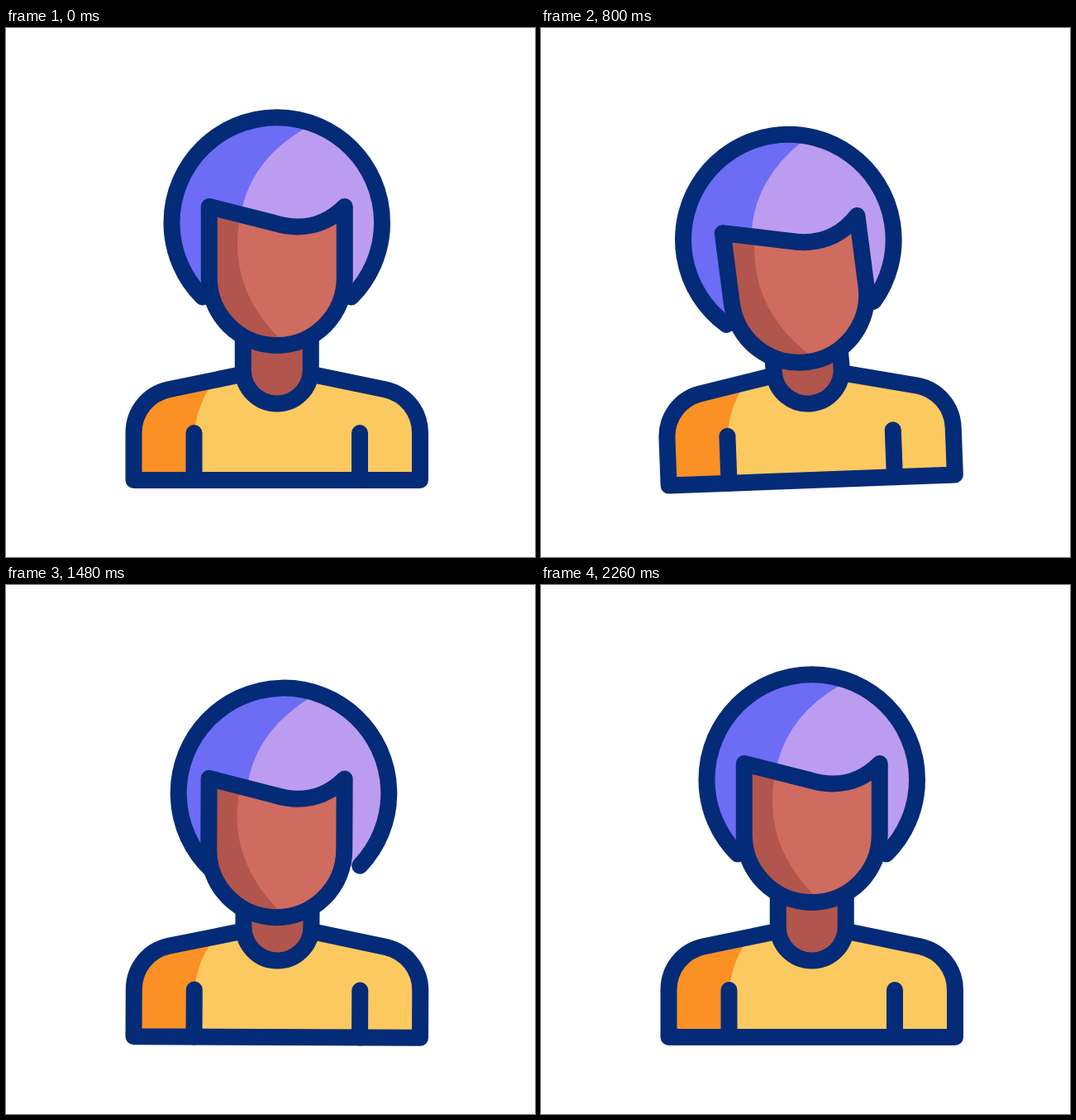
An HTML page for the animation above (2.4 s loop, 640 by 640 pixels).

```html
<!DOCTYPE html>
<html lang="en">
<head>
<meta charset="utf-8">
<title>Avatar</title>
<style>
  html, body { margin: 0; width: 100%; height: 100%; overflow: hidden; background: #fff; }
  svg { display: block; width: 100vw; height: 100vh; }
  .line { fill: none; stroke: #042b77; stroke-width: 20; stroke-linecap: round; stroke-linejoin: round; }
</style>
</head>
<body>
<svg viewBox="0 0 640 640">
  <defs>
    <path id="hairShape" d="M-90 90A127.3 127.3 0 1 1 90 90"/>
    <path id="faceShape" d="M-82 -86L-3 -66C28 -56.5 58 -62 82 -86V0A82 82 0 0 1 -82 0Z"/>
    <path id="shirtShape" d="M154.5 547V490C154.5 464 172 443 196 437.5L283 419.5H372.5L459.5 437.5C483.5 443 501 464 501 490V547Z"/>
    <clipPath id="hairClip"><use href="#hairShape"/></clipPath>
    <clipPath id="faceClip"><use href="#faceShape"/></clipPath>
    <clipPath id="shirtClip"><use href="#shirtShape"/></clipPath>
  </defs>

  <g id="body">
    <use href="#shirtShape" fill="#fb9025"/>
    <path clip-path="url(#shirtClip)" fill="#fbc95f" d="M256 422Q232 450 227.5 490V560H520V410H256Z"/>
    <use href="#shirtShape" class="line"/>
    <path class="line" d="M227.5 490V547M428 490V547"/>
  </g>

  <g id="neck">
    <path class="line" style="fill:#b2554c;stroke-linecap:butt" d="M-41 -45V0A41 41 0 0 0 41 0V-45"/>
  </g>

  <g id="hair">
    <use href="#hairShape" fill="#6c6cf5"/>
    <path clip-path="url(#hairClip)" fill="#bc9cf0" d="M60 -128L34.5 -114.5Q-26.8 -79 -41.5 -20.5L-50 20V100H140V-128Z"/>
    <use href="#hairShape" class="line"/>
  </g>

  <g id="face">
    <use href="#faceShape" fill="#b2554c"/>
    <path clip-path="url(#faceClip)" fill="#d06b60" d="M-44 -76C-56 -20 -40 32 6 76L90 90V-95H-44Z"/>
    <use href="#faceShape" class="line"/>
  </g>
</svg>

<script>
  const LOOP = 2400, STEP = 20, START = 200, SEGMENT = 500;
  const CENTER = 327.75, FLOOR = 547, NECK_RISE = 133.5;

  const [body, neck, hair, face] =
    ['body', 'neck', 'hair', 'face'].map(id => document.getElementById(id));

  // Eases from rest through three extremes and back to rest.
  function sway(time, extremes, lag = 0) {
    const keys = [0, ...extremes, 0];
    const pos = Math.min(Math.max((time - START - lag) / SEGMENT, 0), 4);
    const i = Math.min(Math.floor(pos), 3);
    const u = pos - i;
    return keys[i] + (keys[i + 1] - keys[i]) * u * u * (3 - 2 * u);
  }

  function place(part, x, y, angle) {
    part.setAttribute('transform', `translate(${x} ${y}) rotate(${angle})`);
  }

  function draw(time) {
    const lean = sway(time, [-3, 5, -3]);
    const tilt = sway(time, [-10, 15, -10]);
    const rad = lean * Math.PI / 180;

    body.setAttribute('transform', `rotate(${lean} ${CENTER} ${FLOOR})`);
    place(neck,
      CENTER + NECK_RISE * Math.sin(rad),
      FLOOR - NECK_RISE * Math.cos(rad),
      (lean + tilt) / 2);
    place(face,
      CENTER + sway(time, [-21.5, 35.4, -25.5]),
      302 + sway(time, [22, 10.4, 23.6]),
      tilt);
    // The hair trails the face a little.
    place(hair,
      CENTER + sway(time, [-33, 53, -36.5], 30),
      235.5 + sway(time, [20.7, 11.5, 24], 65),
      sway(time, [-11.5, 13, -11.5]));
  }

  const origin = performance.now();
  function tick() {
    const elapsed = (performance.now() - origin) % LOOP;
    draw(Math.floor(elapsed / STEP) * STEP);
    requestAnimationFrame(tick);
  }
  tick();
</script>
</body>
</html>
```
